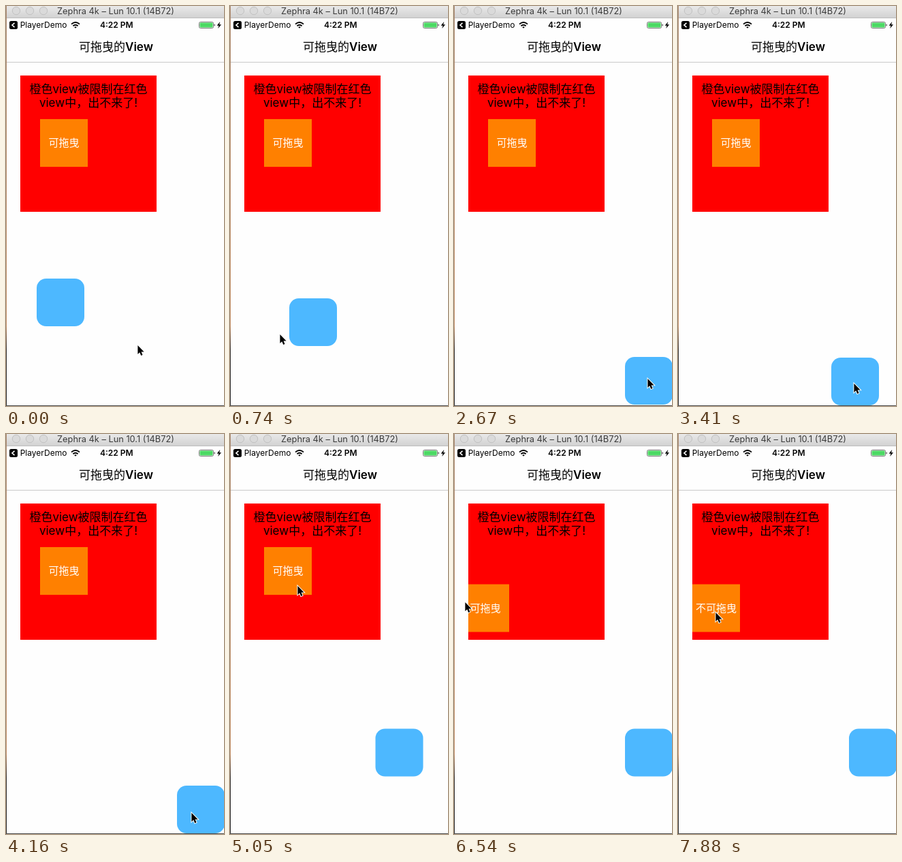
These frames come from a looping animation (320x587 px, 8 s). An HTML page:

```html
<!DOCTYPE html>
<html lang="zh-CN">
<head>
<meta charset="utf-8">
<title>可拖曳的View</title>
<style>
  html, body { margin: 0; width: 100%; height: 100%; overflow: hidden; background: #fff; }
  svg { display: block; width: 320px; height: 587px; }
  text { font-family: Inter, "Noto Sans CJK SC", "Noto Sans CJK", sans-serif; text-anchor: middle; }
</style>
</head>
<body>
<svg viewBox="0 0 320 587">
  <defs>
    <linearGradient id="bar" x2="0" y2="1">
      <stop stop-color="#e9e9e9"/><stop offset="1" stop-color="#d2d2d2"/>
    </linearGradient>
    <linearGradient id="edge" x2="0" y2="1">
      <stop stop-color="#a98468"/><stop offset=".8" stop-color="#c08a60"/>
      <stop offset=".86" stop-color="#2a2624"/><stop offset="1" stop-color="#1c1c1e"/>
    </linearGradient>
    <clipPath id="box"><rect x="21" y="102" width="200" height="200"/></clipPath>
  </defs>

  <rect width="320" height="587" fill="#fefefe"/>

  <!-- window bar -->
  <rect width="320" height="17" fill="url(#bar)"/>
  <rect y="17" width="320" height="1" fill="#bdbdbd"/>
  <g fill="#dadada" stroke="#c2c2c2">
    <circle cx="15" cy="7" r="5.7"/><circle cx="35" cy="7" r="5.7"/><circle cx="55" cy="7" r="5.7"/>
  </g>
  <text x="161" y="12" font-size="12.8" fill="#3a3a3a">Zephra 4k – Lun 10.1 (14B72)</text>

  <!-- status bar -->
  <rect x="5" y="22" width="12" height="12" rx="2.5"/>
  <path d="M12.5 24.8 9 28l3.5 3.2" fill="none" stroke="#fff" stroke-width="1.6"/>
  <text x="55" y="32" font-size="12">PlayerDemo</text>
  <g fill="none" stroke="#000" stroke-width="1.9">
    <path d="M96 26.6Q102 21.4 108 26.6M98.4 29.2Q102 26.2 105.6 29.2"/>
    <path d="M102 32.8 100.2 31Q102 29.7 103.8 31Z" fill="#000" stroke="none"/>
  </g>
  <text x="162.3" y="32" font-size="12" font-weight="600">4:22 PM</text>
  <rect x="283.5" y="23.5" width="21" height="9" rx="2" fill="none" stroke="#777"/>
  <rect x="284.5" y="24.5" width="19" height="7" rx="1" fill="#4cd964"/>
  <rect x="305.5" y="26.5" width="1.5" height="3" rx=".7" fill="#777"/>
  <path d="M314.2 23 309.6 28.8H312.4L311.2 33 316 27.2H313.1Z"/>

  <!-- navigation bar -->
  <text x="161.5" y="66" font-size="17" font-weight="500">可拖曳的<tspan font-weight="600">View</tspan></text>
  <rect y="82" width="320" height="1" fill="#cacaca"/>

  <rect x="21" y="102" width="200" height="200" fill="#f00"/>
  <g font-size="17">
    <text x="121" y="128">橙色view被限制在红色</text>
    <text x="121" y="148">view中，出不来了!</text>
  </g>
  <g clip-path="url(#box)">
    <g id="tile">
      <rect width="70" height="70" fill="#ff8000"/>
      <text id="label" x="35" y="40.4" font-size="15" font-weight="300" fill="#fff">可拖曳</text>
    </g>
  </g>

  <rect id="icon" width="70" height="70" rx="14" fill="#4db8ff"/>

  <rect width="1" height="587" fill="url(#edge)"/>
  <rect y="586" width="320" height="1" fill="#4a4a4a"/>

  <g id="cursor">
    <path transform="translate(1.4 1) scale(.95)" d="M0 0V13.6L3 10.8 5.1 15.8 7.5 14.8 5.4 9.9H9.7Z"
      stroke="#fff" stroke-width="2" paint-order="stroke"/>
  </g>
</svg>
<script>
const LOOP = 8000, TICK = 148.65, LEAD = 11, TICKS = 54, LABEL_TICK = 48;

// Pointer moves: [depart tick, arrive tick, x, y]; it rests in between.
const moves = [
  [0, 1, 75, 452], [1, 3, -14, 452], [4, 6, 158, 510], [7, 8, 224, 510],
  [8, 10, 238, 514], [10, 12, 227, 538], [13, 14, 283, 489], [14, 18, 283, 546],
  [20, 24, 248, 555], [24, 28, 271, 555], [29, 32, 213, 471.5], [32, 34, 98, 222],
  [35, 38, 165, 242], [38, 41, 41, 276.5], [41, 44, 15, 246], [44, 46, 35, 292],
  [46, 50, 57, 270], [52, 53, 54, 261]
];

// Drags follow the pointer, then slide back to the edge in `back` ticks.
const icon = {
  x: 45, y: 400, edge: 251, minX: 1, maxX: 251, maxY: 516,
  drags: [{ grab: 1, drop: 8, back: 4 }, { grab: 14, drop: 24, back: 4 }, { grab: 29, drop: 32, back: 5 }]
};
const tile = {
  x: 50, y: 166, edge: 21, minX: -Infinity, maxX: Infinity, maxY: Infinity,
  drags: [{ grab: 35, drop: 41, back: 5 }]
};

const el = id => document.getElementById(id);
const clamp = (v, lo, hi) => Math.min(hi, Math.max(lo, v));
const smooth = u => u * u * (3 - 2 * u);

function pointer(k) {
  let x = 192, y = 497;
  for (const [from, to, tx, ty] of moves) {
    const u = clamp((k - from) / (to - from), 0, 1);
    x += (tx - x) * u;
    y += (ty - y) * u;
  }
  return { x, y };
}

// Replays every drag tick by tick, so that clamping shifts the grip as it does on screen.
function replay(view) {
  let { x, y } = view, from = x;
  const path = [];
  for (let k = 0; k < TICKS; k++) {
    const now = pointer(k), last = pointer(k - 1);
    for (const { grab, drop, back } of view.drags) {
      if (k > grab && k <= drop) {
        x = from = clamp(x + now.x - last.x, view.minX, view.maxX);
        y = Math.min(y + now.y - last.y, view.maxY);
      } else if (k > drop && k <= drop + back) {
        x = from + (view.edge - from) * smooth((k - drop) / back);
      }
    }
    path.push({ x, y });
  }
  return path;
}

const iconPath = replay(icon), tilePath = replay(tile);
const half = v => Math.round(v * 2) / 2;

function place(id, { x, y }) {
  el(id).setAttribute("transform", `translate(${half(x)} ${half(y)})`);
}

function draw(time) {
  const k = Math.min(TICKS - 1, Math.floor((time % LOOP + LEAD) / TICK));
  place("cursor", pointer(k));
  place("icon", iconPath[k]);
  place("tile", tilePath[k]);
  el("label").textContent = k < LABEL_TICK ? "可拖曳" : "不可拖曳";
}

const start = performance.now();
function loop() {
  draw(performance.now() - start);
  requestAnimationFrame(loop);
}
loop();
</script>
</body>
</html>
```
